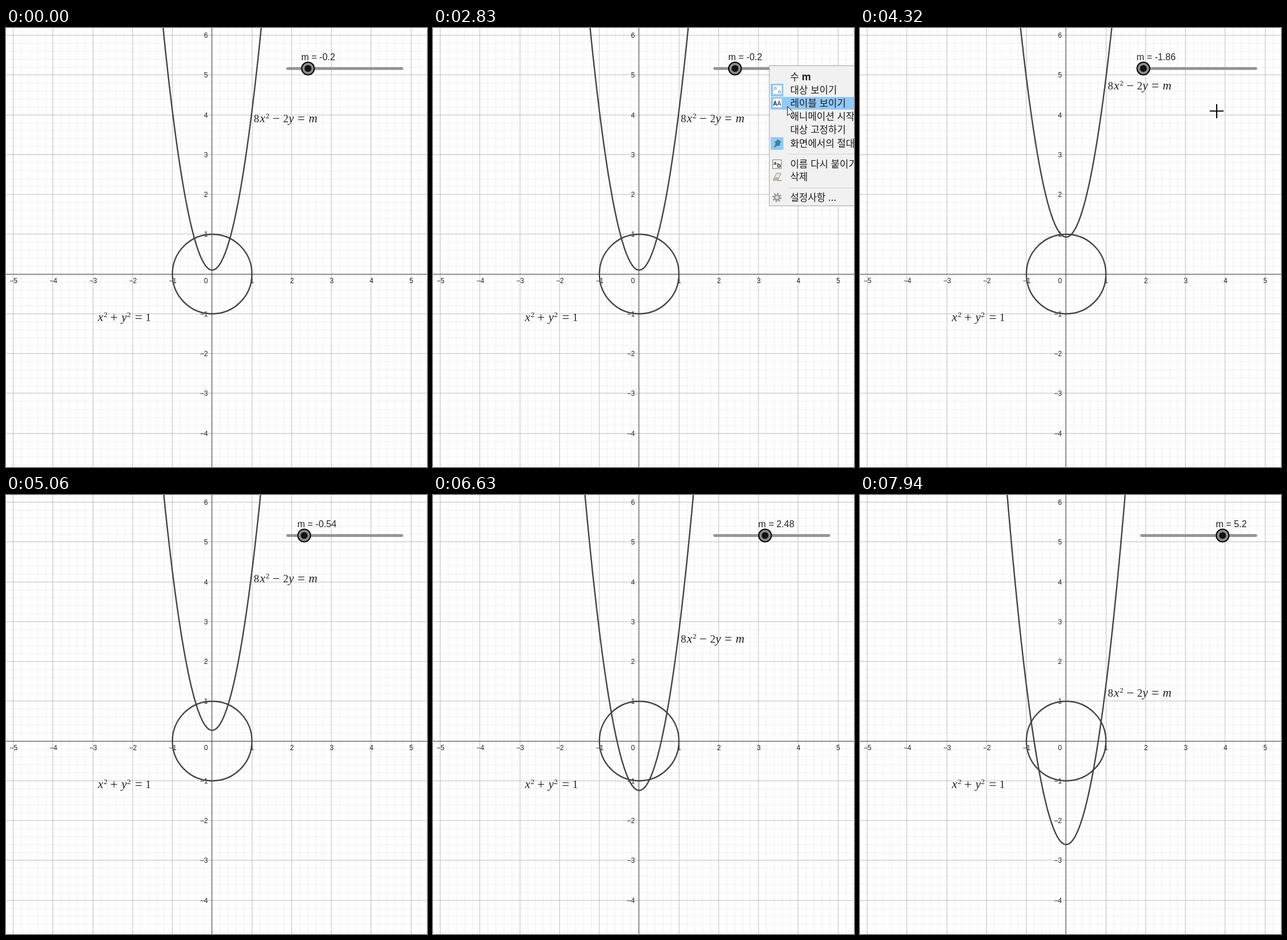
Recreate the animation shown at these times as an HTML page. Size 733 by 764 pixels, loop 8 s.

```html
<!DOCTYPE html>
<html lang="ko">
<head>
<meta charset="utf-8">
<title>Parabola and circle</title>
<style>
  html, body { margin: 0; width: 100%; height: 100%; overflow: hidden; background: #fff; }
  svg { display: block; width: 100vw; height: 100vh; }
  .grid path { fill: none; stroke-width: 1; shape-rendering: crispEdges; }
  .axis { font: 12px "Liberation Sans", Arial, sans-serif; fill: #222; }
  .value { font: 16px "Liberation Sans", Arial, sans-serif; fill: #222; }
  .math { font: 18.5px "Liberation Serif", serif; fill: #222; }
  .var { font-style: italic; font-size: 21px; }
  .sup { font-size: 13.5px; }
  .op { font-size: 23px; }
  .menu text { font: 300 16.7px "Noto Sans CJK KR", "Noto Sans CJK JP", "Noto Sans CJK", sans-serif; fill: #1c1c1c; }
  .menu .tiny { font: bold 10px "Liberation Sans", Arial, sans-serif; fill: #222; }
  .curve { fill: none; stroke: #444; stroke-width: 2.4; stroke-linejoin: round; }
</style>
</head>
<body>
<svg viewBox="0 0 733 764" preserveAspectRatio="none">
  <g class="grid">
    <path id="minor" stroke="#efefef"/>
    <path id="major" stroke="#c0c0c0"/>
    <path d="M0 428.5H733M358.5 0V764" stroke="#333"/>
  </g>
  <g id="ticks" class="axis"></g>
  <circle class="curve" cx="358.95" cy="428.2" r="69.25"/>
  <path id="parabola" class="curve"/>
  <g id="circleName" class="math" transform="translate(0 510)"></g>
  <g id="curveName" class="math"></g>

  <path d="M490.5 70.5H689" stroke="#969696" stroke-width="5" stroke-linecap="round"/>
  <g id="knob">
    <circle r="11" fill="#8c8c8c" stroke="#000" stroke-width="2"/>
    <circle r="6" fill="#111"/>
  </g>
  <text id="value" class="value" y="56"></text>

  <g id="menu" class="menu">
    <path d="M740 65.5H585.5V309.5H740" fill="#f1f1f1" stroke="#a2a2a2"/>
    <rect id="hover" x="588" width="150" fill="#91c9f7"/>
    <path d="M618 219.5H733M618 278.5H733" stroke="#d3d3d3"/>
    <path d="M588 97h22v22h-22zM588 120h22v22h-22zM588 190h22v22h-22z" fill="#91c9f7"/>
    <path d="M592 100h15v15h-15zM592 123h15v15h-15z" fill="#fff"/>
    <g fill="#e3eaf5" stroke="#777" stroke-width=".8">
      <circle cx="596" cy="105" r="2.2"/><circle cx="603" cy="111" r="2.2"/>
    </g>
    <text class="tiny" x="592" y="135">A</text>
    <text class="tiny" x="599" y="135" style="fill:#555">A</text>
    <path d="M599 194l7 4-2 2-1 5-3-1-6 4 3-7-2-3 4-1z" fill="#35849a" stroke="#28687c" stroke-width=".6"/>
    <rect x="591.5" y="229.5" width="15" height="15" fill="#fff" stroke="#777"/>
    <text class="tiny" x="593" y="238" style="font-size:9px">a</text>
    <text class="tiny" x="599" y="243" style="font-size:11px">b</text>
    <path d="M598 253h8l-6 12h-8z" fill="#eee8d6" stroke="#888"/>
    <path d="M592 265l2-5h8l-2 5z" fill="#bbb49b"/>
    <path d="M600 265.5h7" stroke="#777"/>
    <circle cx="599" cy="295" r="6.7" fill="none" stroke="#999" stroke-width="3" stroke-dasharray="2.6 2.66"/>
    <circle cx="599" cy="295" r="4.2" fill="#ddd" stroke="#999" stroke-width="2.6"/>
    <text x="622" y="91">수 <tspan font-weight="700">m</tspan></text>
  </g>

  <path id="cross" d="M-12 0H12M0 -12V12.5" stroke="#000" stroke-width="2"/>
  <path id="arrow" d="M.5 .5V16.5L4.2 13 7 19 9.6 17.8 7 12H12Z" fill="#fff" stroke="#000"/>
</svg>
<script>
const LOOP = 8000, UNIT = 69.25, OX = 358.95, OY = 428.2, STEP = 66.7;
const $ = id => document.getElementById(id);

function add(parent, text, attrs) {
  const el = document.createElementNS("http://www.w3.org/2000/svg", "text");
  for (const k in attrs) el.setAttribute(k, attrs[k]);
  el.textContent = text;
  parent.append(el);
}

function gridPath(gap) {
  let d = "";
  for (let i = -40; i <= 40; i++) {
    const x = Math.floor(OX + i * gap) + .5;
    const y = Math.floor(OY + i * gap) + .5;
    d += `M${x} 0V764M0 ${y}H733`;
  }
  return d;
}
$("minor").setAttribute("d", gridPath(UNIT / 5));
$("major").setAttribute("d", gridPath(UNIT));

const num = n => String(n).replace("-", "−");
for (let n = -5; n <= 6; n++) {
  if (n && n < 6) add($("ticks"), num(n), { x: OX + n * UNIT + .5, y: 444, "text-anchor": "middle" });
  if (n && n > -5) add($("ticks"), num(n), { x: 351.5, y: OY - n * UNIT + 4.3, "text-anchor": "end" });
}
add($("ticks"), "0", { x: 348, y: 444, "text-anchor": "middle" });

// glyph, x, y offset, class
function formula(id, parts) {
  for (const [s, x, y, cls] of parts) add($(id), s, { x, y, class: cls });
}
formula("circleName", [
  ["x", 160, 0, "var"], ["2", 170, -7, "sup"], ["+", 181.5, 1, "op"], ["y", 201, 0, "var"],
  ["2", 210.5, -7, "sup"], ["=", 224.5, 1, "op"], ["1", 243, 0, ""]
]);
formula("curveName", [
  ["8", 431.5, 0, ""], ["x", 442, 0, "var"], ["2", 452, -7, "sup"], ["−", 464, 1, "op"],
  ["2", 482.5, 0, ""], ["y", 492, 0, "var"], ["=", 507.5, 1, "op"], ["m", 527, 0, "var"]
]);

const items = [
  ["대상 보이기", 108], ["레이블 보이기", 131], ["애니메이션 시작", 154], ["대상 고정하기", 177],
  ["화면에서의 절대 위치", 201], ["이름 다시 붙이기", 237], ["삭제", 259], ["설정사항 ...", 295]
];
for (const [s, y] of items) add($("menu"), s, { x: 622, y: y + 6 });

let curve = "";
for (let i = -80; i <= 80; i++) {
  const x = i / 50;
  curve += `${curve ? "L" : "M"}${OX + x * UNIT} ${OY - 4 * x * x * UNIT}`;
}
$("parabola").setAttribute("d", curve);

const values = [[0, -.2], [3430, -.2], [3640, -.64], [4325, -2], [5060, -.54],
  [6100, 1.56], [7180, 3.66], [7940, 5.2], [LOOP, 5.2]];
const pointer = [[520, 654, 37], [980, 592, 74], [1330, 592, 74], [1400, 583, 62], [1460, 586, 66],
  [1640, 597, 73], [1760, 598, 78], [2050, 608, 108], [2200, 608, 108], [2460, 615, 133],
  [2700, 615, 133], [3010, 621, 144], [4300, 621, 144.5], [4600, 688, 22]];

// the value advances in whole ticks between two knots
function slider(t) {
  const i = values.findIndex(k => k[0] > t) - 1;
  const [a, u] = values[i], [b, v] = values[i + 1];
  const n = Math.max(1, Math.round((b - a) / 69));
  const m = u + (v - u) * Math.floor((t - a) / (b - a) * n + 1e-6) / n;
  return Math.round(m * 50) / 50;
}

function place(t) {
  const i = pointer.findIndex(k => k[0] > t);
  if (i < 1) return pointer[i < 0 ? pointer.length - 1 : 0].slice(1);
  const [a, x, y] = pointer[i - 1], [b, p, q] = pointer[i];
  const f = (t - a) / (b - a);
  return [x + (p - x) * f, y + (q - y) * f];
}

const move = (id, x, y) => $(id).setAttribute("transform", `translate(${x} ${y})`);
const show = (id, on) => $(id).setAttribute("visibility", on ? "visible" : "hidden");

function draw(t) {
  const m = slider(t), shift = m / 2 * UNIT, x = 525.8 + (m + .2) * 19.54;
  move("parabola", 0, shift);
  move("curveName", 0, 171 + shift);
  move("knob", x, 70.5);
  $("value").setAttribute("x", x - 11.8);
  $("value").textContent = "m = " + m;

  const open = t >= 1460 && t < 3300;
  const q = t < 520 ? t : t - (t - 520) % STEP;
  const [px, py] = place(q);
  show("menu", open);
  show("arrow", open);
  show("cross", !open && t >= 520 && t < 4640);
  move("arrow", px, py);
  move("cross", px, py);

  const row = py < 97 ? [67, 30] : py < 120 ? [97, 22] : py < 143 ? [120, 22] : [143, 23];
  $("hover").setAttribute("y", row[0]);
  $("hover").setAttribute("height", row[1]);
}

const start = performance.now();
function tick() {
  draw((performance.now() - start) % LOOP);
  requestAnimationFrame(tick);
}
draw(0);
tick();
</script>
</body>
</html>
```
